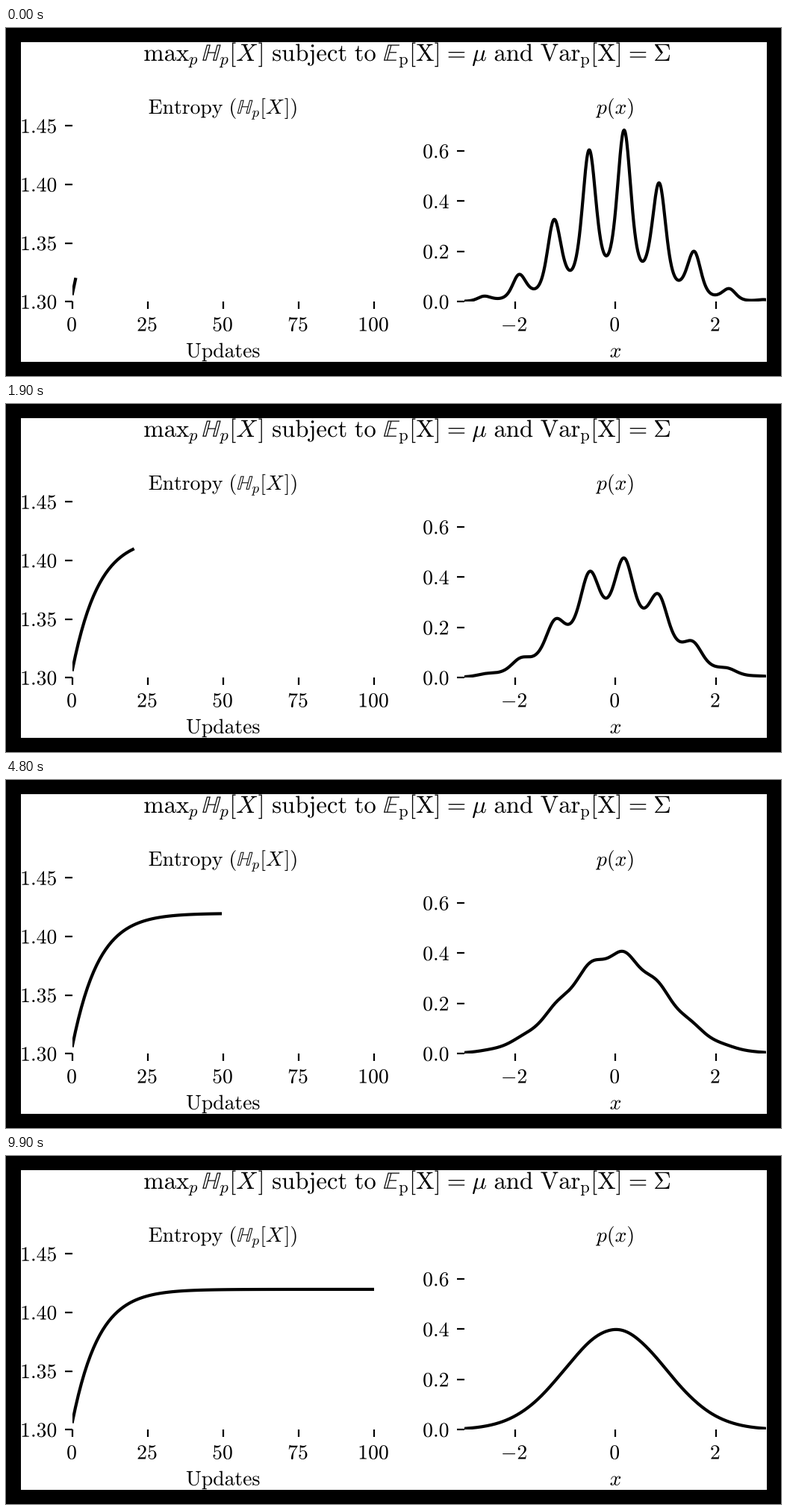
Animation of 1038 by 467 pixels, one loop 10 s. Source, as a matplotlib script:

```python
import matplotlib.pyplot as plt
import numpy as np
from matplotlib.animation import FuncAnimation
from matplotlib.patches import PathPatch, Rectangle
from matplotlib.path import Path
from matplotlib.textpath import TextPath

plt.rcParams["mathtext.fontset"] = "cm"

W, H, DPI = 1038, 467, 200
FRAMES, INTERVAL = 100, 100
EM, TITLE_EM = 27.7, 32.7      # pixels

# Density: a normal law with a log-ripple that decays at every update.
VARIANCE, RIPPLE, DECAY = 1.0015, 0.702, 0.94
FREQUENCY = 2 * np.pi * np.sqrt(2)


def density(x, update):
    amplitude = RIPPLE * DECAY**update
    normal = np.exp(-x**2 / (2 * VARIANCE)) / np.sqrt(2 * np.pi * VARIANCE)
    return normal * np.exp(amplitude * np.sin(FREQUENCY * x)) / np.i0(amplitude)


def entropy(update):
    x, dx = np.linspace(-8, 8, 4001, retstep=True)
    p = density(x, update)
    return -np.sum(p * np.log(p)) * dx


fig = plt.figure(figsize=(W / DPI, H / DPI), dpi=DPI, facecolor="black")
page = fig.add_axes([0, 0, 1, 1], xlim=(0, W), ylim=(H, 0))
page.axis("off")
page.add_patch(Rectangle((20, 19), 999, 429, color="white", lw=0))


def advance(math, size):
    """Width of a formula with its side bearings, measured with an end mark."""
    def right(s):
        return TextPath((0, 0), f"${s}$", size=size).get_extents().x1
    return right(math + "|") - right("|")


def typeset(x, baseline, *pieces, em=EM, align=0.5):
    """Set pieces in a row; a leading underscore makes a subscript."""
    row, width = [], 0
    for piece in pieces:
        is_sub = piece.startswith("_")
        math, size = piece.lstrip("_"), em * (0.68 if is_sub else 1)
        row.append((math, size, width, 0.15 * em * is_sub))
        width += advance(math, size) + 0.045 * em * is_sub
    for math, size, offset, drop in row:
        path = TextPath((0, 0), f"${math}$", size=size)
        points = path.vertices * [1, -1] + [x - align * width + offset, baseline + drop]
        page.add_patch(PathPatch(Path(points, path.codes), fc="black", lw=0))


EQUALS = r"\hspace{0.08}=\hspace{0.08}"
BRACKET_X = r"[X\hspace{0.08}]"

typeset(537.6, 44, r"\mathrm{max}", "_p", r"\,\mathbb{H}", "_p",
        BRACKET_X + r"\ \mathrm{subject}\ \mathrm{to}\ ",
        r"\mathbb{E}", r"_\mathrm{p}",
        r"[\mathrm{X}]" + EQUALS + r"\mu\ \mathrm{and}\ ",
        r"\mathrm{Var}", r"_\mathrm{p}",
        r"[\mathrm{X}]" + EQUALS + r"\Sigma", em=TITLE_EM)
typeset(291, 115, r"\mathrm{Entropy}\ (", r"\mathbb{H}", "_p", BRACKET_X + ")")
typeset(816.5, 115, "p(x)")
typeset(290.7, 442, r"\mathrm{Updates}")
typeset(816.5, 442, "x")


def panel(left, xlim, ylim, xticks, yticks, yformat):
    bottom, width, height = 367.25, 404, 236
    ax = fig.add_axes([left / W, 1 - bottom / H, width / W, height / H],
                      xlim=xlim, ylim=ylim, facecolor="none")
    ax.set_xticks(xticks, [""] * len(xticks))
    ax.set_yticks(yticks, [""] * len(yticks))
    ax.spines[:].set_visible(False)
    for tick in xticks:
        x = left + width * (tick - xlim[0]) / (xlim[1] - xlim[0])
        typeset(x - 1, 406.7, str(tick))
    for tick in yticks:
        y = bottom - height * (tick - ylim[0]) / (ylim[1] - ylim[0])
        typeset(left - 20.7, y + 9.6, yformat.format(tick), align=1)
    return ax.plot([], [], color="black", lw=1.5)[0]


entropy_line = panel(89, (0, 100), (1.3, 1.45), range(0, 101, 25),
                     np.linspace(1.3, 1.45, 4), "{:.2f}")
density_line = panel(614.2, (-3, 3), (0, 0.7), range(-2, 3, 2),
                     np.linspace(0, 0.6, 4), "{:.1f}")

updates = np.arange(FRAMES + 1)
entropies = np.array([entropy(u) for u in updates])
xs = np.linspace(-3, 3, 600)


def draw(frame):
    update = frame + 1
    entropy_line.set_data(updates[:update + 1], entropies[:update + 1])
    density_line.set_data(xs, density(xs, update))
    return entropy_line, density_line


animation = FuncAnimation(fig, draw, frames=FRAMES, interval=INTERVAL,
                          repeat=True, repeat_delay=0)
plt.show()
```
